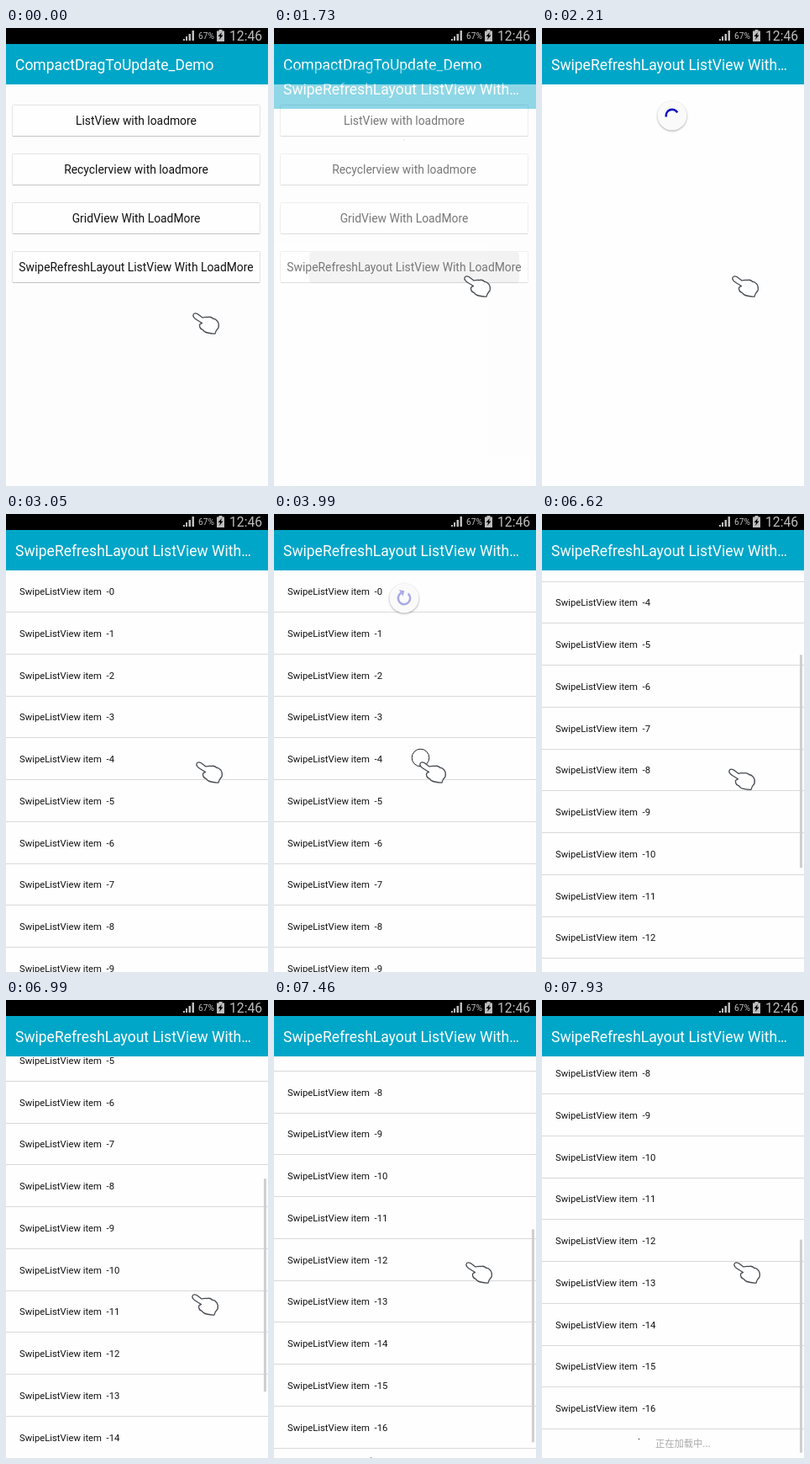
An HTML page that plays this animation: 312 px wide and 544 px high, repeating every 8000 ms.

```html
<!DOCTYPE html>
<html lang="en">
<head>
<meta charset="utf-8">
<title>Pull to refresh</title>
<style>
  html, body { margin: 0; height: 100%; overflow: hidden; background: #fdfdfd; }
  svg { display: block; width: 100vw; height: 100vh; }
  text { font-family: Roboto, sans-serif; white-space: pre; }
  .title { font-size: 17.5px; fill: #fff; }
  .button { font-size: 13.87px; fill: #111; text-anchor: middle; }
  .item { font-size: 11.27px; fill: #111; }
  .line { fill: #d9d9d9; shape-rendering: crispEdges; }
  #disc { filter: drop-shadow(0 1px 1px #0005); }
</style>
</head>
<body>
<svg viewBox="0 0 312 544">
  <g id="menu">
    <rect width="312" height="544" fill="#fdfdfd"/>
    <rect y="19" width="312" height="48" fill="#00a6c8"/>
    <text class="title" x="11" y="50">CompactDragToUpdate_Demo</text>
    <g id="buttons"></g>
    <rect id="ripple" x="42" y="266" width="250" height="37" rx="4" fill="#000" opacity=".08"/>
  </g>

  <g id="page">
    <rect y="19" width="312" height="525" fill="#fefefe"/>
    <g id="list">
      <g id="rows"></g>
      <circle cx="115.5" cy="924.5" r=".8" fill="#444"/>
      <text x="135" y="934" font-size="11.27" fill="#aaa" style="font-family:'Noto Sans CJK SC','Noto Sans CJK',sans-serif">正在加载中...</text>
    </g>
    <rect id="thumb" x="307" width="3" height="253" fill="#cfcfcf"/>
    <g id="spinner">
      <circle id="disc" r="17.5" fill="#fafafa"/>
      <path id="arc" fill="none" stroke="#0000c4" stroke-width="2.5"/>
      <path id="arrow" d="M-4.5 0H4.5L0 4.8Z" fill="#0000c4"/>
    </g>
    <rect y="19" width="312" height="48" fill="#00a6c8"/>
    <text class="title" x="11" y="50">SwipeRefreshLayout ListView With…</text>
  </g>

  <rect width="312" height="19"/>
  <g fill="#bdbdbd">
    <path d="M211 15v-2h2v2zM214 15v-5h2v5zM217.500 15v-8h2.500v8zM221.500 15v-12h2.500v12z"/>
    <text x="229" y="13" font-size="10.2">67%</text>
    <path d="M253.500 2h4v1.500h2.500v12.500h-9v-12.500h2.500z"/>
    <path d="M257 5l-4.500 5h2.500l-1 4 4.500-5.500h-2.500z" fill="#000"/>
    <text x="266" y="15" font-size="15.7">12:46</text>
  </g>

  <circle id="ring" r="10.300" fill="none" stroke="#222"/>
  <path id="hand" fill="#fff" stroke="#454a50" stroke-width="1.3" stroke-linejoin="round"
    d="M12 6L6 1.500Q1.500-.5 .8 3.500Q1 6 5 8.500L11.500 12.500Q7.500 13.500 8.800 17Q9.300 19.500 12.500 20.500Q14 23.500 18 24Q24 25.500 27 25Q28 21 31 18Q32 13.500 30 10.500Q27 7 25 7.500Q22 4.500 18.500 5.500Q15 5 12 6Z"/>
</svg>

<script>
const LOOP = 8000, STEP = 117, PHASE = 1720, PITCH = 49.75;
const $ = id => document.getElementById(id);
const set = (id, attrs) => {
  for (const name in attrs) $(id).setAttribute(name, attrs[name]);
};
const move = (id, x, y, more = '') => set(id, { transform: `translate(${x} ${y}) ${more}` });
const show = (id, visible) => set(id, { visibility: visible ? 'visible' : 'hidden' });

$('buttons').innerHTML = [
  'ListView with loadmore', 'Recyclerview with loadmore',
  'GridView With LoadMore', 'SwipeRefreshLayout ListView With LoadMore'
].map((label, i) => `<g transform="translate(0 ${58 * i})">
  <rect x="7.500" y="91.500" width="295" height="37" rx="1" fill="#fefefe" stroke="#e4e4e4"/>
  <rect class="line" x="8" y="128" width="294" height="1" style="fill:#c4c4c4"/>
  <text class="button" x="155" y="115">${label}</text></g>`).join('');

$('rows').innerHTML = Array.from({ length: 17 }, (_, i) => `<g transform="translate(0 ${PITCH * i})">
  <text class="item" x="16" y="96">SwipeListView item  -${i}</text>
  <rect class="line" y="116" width="312" height="1"/></g>`).join('');

// Linear interpolation through [time, value] points.
function track(points, t) {
  const i = points.findIndex(p => p[0] > t);
  if (i === 0) return points[0][1];
  if (i < 0) return points[points.length - 1][1];
  const [t0, a] = points[i - 1], [t1, b] = points[i];
  return a + (b - a) * (t - t0) / (t1 - t0);
}

const handX = [[300, 222], [720, 226], [3100, 226], [3270, 173], [4060, 173], [4170, 172],
  [5930, 172], [6150, 215], [6500, 222], [6860, 221], [7000, 221], [7110, 226], [7450, 228]];
const handY = [[300, 338], [720, 294], [3100, 294], [3270, 215], [3400, 215], [3943, 294],
  [4060, 320], [4170, 326], [5930, 326], [6150, 430], [6500, 300], [6860, 349],
  [7000, 349], [7110, 410], [7450, 311]];
const scroll = [[6150, 0], [6270, 40], [6500, 180], [6740, 260], [6860, 269], [7100, 269],
  [7220, 300], [7450, 380], [7580, 396], [7800, 403]];
const slide = [[1720, 29], [1837, 8], [1954, 0]];
const fade = [[1720, .43], [1837, .85], [1954, 1]];
const scale = [[1720, .06], [1837, .7], [1954, 1], [2560, 1], [2790, 0], [3350, 0],
  [3351, 1], [5590, 1], [5810, 0]];
const discY = [[3300, 104], [3301, 49], [3400, 55], [3943, 100], [4060, 107], [4177, 104]];
const thumb = [[6150, 0], [6270, 1]];

const smooth = x => x * x * (3 - 2 * x);
const clamp = x => Math.min(1, Math.max(0, x));
const polar = deg => [7.2 * Math.cos(deg * Math.PI / 180), 7.2 * Math.sin(deg * Math.PI / 180)];

function drawSpinner(t) {
  const pulling = t > 3300 && t < 4120;
  let start, sweep;
  if (pulling) {
    start = -50 + (t - 3943) * .3;
    sweep = 288;
  } else {
    const cycle = (t - 5211) / 1332, u = cycle - Math.floor(cycle);
    const tail = 270 * smooth(clamp(2 * u - 1)), head = 270 * smooth(clamp(2 * u));
    start = -50 + (t - 5464) * .162 + 270 * Math.floor(cycle) + tail;
    sweep = 10 + head - tail;
  }
  const end = start + sweep;
  set('arc', { d: `M${polar(start)}A7.2 7.2 0 ${+(sweep > 180)} 1 ${polar(end)}`, opacity: pulling ? .32 : 1 });
  set('arrow', { transform: `translate(${polar(end)}) rotate(${end})`, opacity: .32 });
  show('arrow', pulling);
  move('spinner', 155, track(discY, t), `scale(${track(scale, t)})`);
}

function draw(now) {
  const time = now % LOOP;
  const t = PHASE + STEP * Math.floor((time - PHASE) / STEP);
  const x = track(handX, t), y = track(handY, t), offset = track(scroll, t);

  show('page', t >= 1720);
  show('ripple', t >= 1720);
  move('page', 0, track(slide, t));
  set('page', { opacity: track(fade, t) });

  set('list', { display: t >= 2530 ? 'inline' : 'none' });
  move('list', 0, -offset);
  move('thumb', 0, 67 + .54 * offset);
  set('thumb', { opacity: track(thumb, t) });
  drawSpinner(t);

  const dragging = (t > 3330 && t < 4100) || (t > 6150 && t < 6500) || (t > 7110 && t < 7450);
  show('ring', dragging);
  move('ring', x + 1.5, y - 4.5);
  move('hand', x, y);
  requestAnimationFrame(() => draw(performance.now()));
}
draw(0);
</script>
</body>
</html>
```
